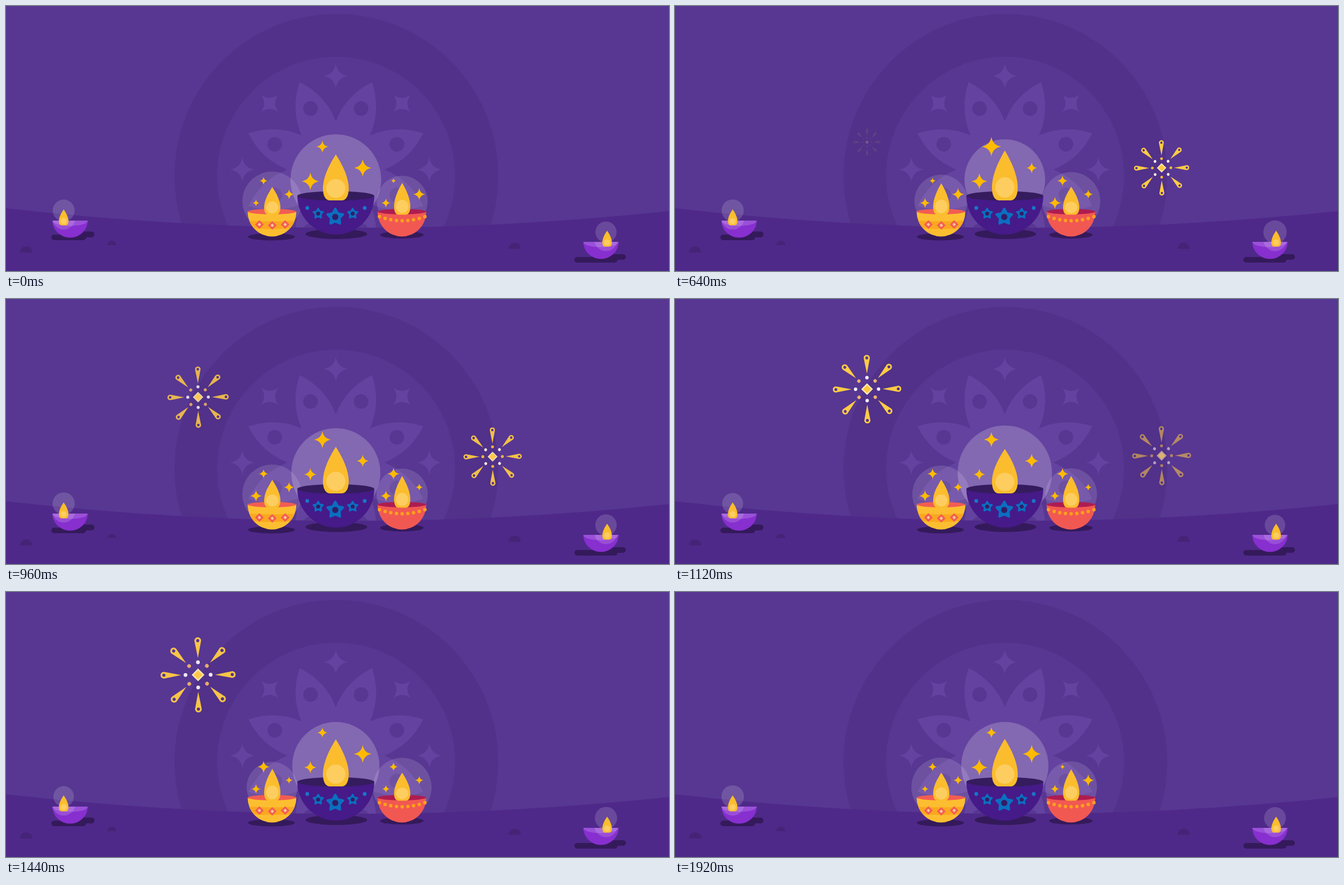
An HTML page with a canvas for the animation above (2 s loop, 1184 by 473 pixels).

```html
<!DOCTYPE html>
<html lang="en">
<head>
<meta charset="utf-8">
<title>Festival lamps</title>
<style>
  html, body { margin: 0; width: 100%; height: 100%; overflow: hidden; background: #573792; }
  canvas { display: block; width: 1184px; height: 473px; }
</style>
</head>
<body>
<canvas id="stage" width="1184" height="473"></canvas>
<script>
const ctx = document.getElementById('stage').getContext('2d');
const TAU = Math.PI * 2;
const LOOP = 2000, STEP = 80;
const BG = '#573792', SHADOW = '#341a5b', SPARK = '#ffbb00';

const clamp = v => Math.max(0, Math.min(1, v));
const wave = (t, mid, amp, peak, period) => mid + amp * Math.cos(TAU * (t - peak) / period);

function fill(color) {
  ctx.fillStyle = color;
  ctx.fill();
}

function ellipse(x, y, rx, ry, color) {
  ctx.beginPath();
  ctx.ellipse(x, y, rx, ry, 0, 0, TAU);
  fill(color);
}

const circle = (x, y, r, color) => ellipse(x, y, r, r, color);

function half(x, y, rx, ry, color, up) {
  ctx.beginPath();
  ctx.ellipse(x, y, rx, ry, 0, 0, Math.PI, !!up);
  ctx.closePath();
  fill(color);
}

function bar(x0, y0, x1, y1) {
  ctx.beginPath();
  ctx.roundRect(x0, y0, x1 - x0, y1 - y0, (y1 - y0) / 2);
  fill(SHADOW);
}

function diamond(x, y, r, color) {
  ctx.beginPath();
  ctx.moveTo(x, y - r);
  ctx.lineTo(x + r, y);
  ctx.lineTo(x, y + r);
  ctx.lineTo(x - r, y);
  fill(color);
}

function sparkle(x, y, r, color, turn = 0) {
  const k = r * 0.14;
  ctx.save();
  ctx.translate(x, y);
  ctx.rotate(turn);
  ctx.beginPath();
  ctx.moveTo(0, -r);
  ctx.quadraticCurveTo(k, -k, r, 0);
  ctx.quadraticCurveTo(k, k, 0, r);
  ctx.quadraticCurveTo(-k, k, -r, 0);
  ctx.quadraticCurveTo(-k, -k, 0, -r);
  fill(color);
  ctx.restore();
}

function fiveStar(x, y, r, hole) {
  const line = r * 0.25, reach = r - line / 2;
  ctx.beginPath();
  for (let i = 0; i < 10; i++) {
    const a = i * TAU / 10 - TAU / 4, d = i % 2 ? reach * 0.54 : reach;
    ctx.lineTo(x + d * Math.cos(a), y + d * Math.sin(a));
  }
  ctx.closePath();
  fill('#0b6fc1');
  ctx.strokeStyle = '#0b6fc1';
  ctx.lineWidth = line;
  ctx.lineJoin = 'round';
  ctx.stroke();
  circle(x, y, hole, '#321c66');
}

// Flame standing on (x, base); "rest" is the height at which its core is round.
function flame(x, base, top, w, rest, core) {
  const h = rest;
  ctx.save();
  ctx.translate(x, base);
  ctx.scale(1, (base - top) / rest);
  ctx.beginPath();
  ctx.moveTo(0, -h);
  ctx.bezierCurveTo(w * 0.3, -h * 0.87, w, -h * 0.55, w, -h * 0.26);
  ctx.bezierCurveTo(w, -h * 0.1, w * 0.8, 0, w * 0.45, 0);
  ctx.lineTo(-w * 0.45, 0);
  ctx.bezierCurveTo(-w * 0.8, 0, -w, -h * 0.1, -w, -h * 0.26);
  ctx.bezierCurveTo(-w, -h * 0.55, -w * 0.3, -h * 0.87, 0, -h);
  fill('#fbbd2d');
  circle(0, -h * 0.26, core, '#fdcd60');
  ctx.restore();
}

function flower(x, y) {
  const color = '#64429f', valley = 86, eighth = TAU / 8;
  const vx = valley * Math.sin(eighth / 2), vy = -valley * Math.cos(eighth / 2);
  for (let i = 0; i < 8; i++) {
    ctx.save();
    ctx.translate(x, y);
    ctx.rotate((i + 0.5) * eighth);
    ctx.beginPath();
    ctx.moveTo(0, 2);
    ctx.lineTo(-vx - 0.3, vy);
    ctx.quadraticCurveTo(-34, -130, 0, -169);
    ctx.quadraticCurveTo(34, -130, vx + 0.3, vy);
    fill(color);
    circle(0, -118, 13, BG);
    ctx.restore();
    const a = i * eighth;
    sparkle(x + 167 * Math.sin(a), y - 167 * Math.cos(a), 22, color, a);
  }
}

function backdrop() {
  ctx.fillStyle = BG;
  ctx.fillRect(0, 0, 1184, 473);
  circle(590, 303, 289, '#513189');
  circle(589.5, 303, 212.5, BG);
  flower(589, 292);
  ctx.beginPath();
  ctx.moveTo(0, 361);
  ctx.quadraticCurveTo(592, 428.5, 1184, 366);
  ctx.lineTo(1184, 473);
  ctx.lineTo(0, 473);
  fill('#4f2989');
  half(36, 440, 11, 11, '#452477', true);
  half(189, 427, 8, 8, '#452477', true);
  half(908.5, 433.5, 11, 11, '#452477', true);
}

function firework(t, f) {
  const alpha = Math.min(clamp((t - f.start) / 430), clamp((f.end - t) / 445));
  if (alpha <= 0) return;
  const e = Math.exp(-(t - f.ref) / 290);
  const r = f.size - f.grow * e;
  ctx.save();
  ctx.globalAlpha = alpha;
  ctx.translate(f.x, f.y + f.rise * e);
  ctx.rotate(-0.01);
  for (let i = 0; i < 8; i++) {
    ctx.save();
    ctx.rotate(i * TAU / 8);
    // Ray with a round, pierced head.
    ctx.beginPath();
    ctx.moveTo(0, -r * 0.45);
    ctx.lineTo(-r * 0.088, -r * 0.9);
    ctx.arc(0, -r * 0.91, r * 0.09, Math.PI, TAU);
    ctx.closePath();
    ctx.moveTo(r * 0.042, -r * 0.91);
    ctx.arc(0, -r * 0.91, r * 0.042, 0, TAU);
    ctx.fillStyle = '#ffcb45';
    ctx.fill('evenodd');
    circle(0, -r * 0.335, r * 0.05, f.dots[i % 2]);
    ctx.restore();
  }
  diamond(0, 0, r * 0.17, '#ffedba');
  diamond(0, 0, r * 0.12, '#ffc640');
  ctx.restore();
}

const fireworks = [
  { x: 869, y: 277.5, rise: 34.5, size: 53.5, grow: 12.5, ref: 320, start: 140, end: 1370,
    dots: ['#fbbd3a', '#fff4e6'] },
  { x: 343, y: 141.5, rise: 101.5, size: 70, grow: 46, ref: 640, start: 590, end: 1865,
    dots: ['#f6effa', '#efb268'] }
];

function bowl(x, y, rx, depth, rimRy, body, rim) {
  half(x, y, rx, depth, body);
  ellipse(x, y, rx, rimRy, rim);
}

function leftLamp(t) {
  circle(475, 348.5, wave(t, 49.1, 3.9, 960, 1000), 'rgba(255,255,255,.13)');
  ellipse(474, 412, 42, 6.5, SHADOW);
  half(475, 367, 43.5, 44.5, '#fcbe30');
  ctx.save();
  ctx.beginPath();
  ctx.ellipse(475, 367, 43.5, 44.5, 0, 0, Math.PI);
  ctx.clip();
  ctx.beginPath();
  ctx.moveTo(430, 383);
  ctx.quadraticCurveTo(475, 386, 520, 383);
  ctx.lineTo(520, 396);
  ctx.quadraticCurveTo(475, 400, 430, 396);
  fill('#fba71f');
  ctx.restore();
  ellipse(475, 367, 43.5, 4.8, '#f25d52');
  for (const [x, y] of [[452.5, 390], [475.5, 391.5], [498.5, 390]]) {
    diamond(x, y, 7.8, '#f25d52');
    diamond(x, y, 3.2, '#fbc59a');
  }
  flame(475.5, 372.5, wave(t, 319.3, 4, 20, 1000), 14.5, 51, 11);
}

function rightLamp(t) {
  circle(707.5, 348.5, wave(t, 49.2, 3.8, 520, 1000), 'rgba(255,255,255,.13)');
  ellipse(707, 408.5, 39, 6.5, SHADOW);
  bowl(707, 367, 43.5, 44.5, 4.8, '#f15852', '#ae1c51');
  for (let i = -4; i <= 4; i++) {
    circle(707.5 + i * 10.15, 383.3 - i * i * 0.46, 3.1, '#fb9f1f');
  }
  flame(707.5, 372.5, wave(t, 319.5, 4, 540, 1000), 14.5, 53, 11);
}

function mainLamp(t) {
  circle(589, 310, wave(t, 78.3, 6.4, 180, 1000), 'rgba(255,255,255,.2)');
  ellipse(590, 407, 55, 9, SHADOW);
  bowl(589, 339, 68.7, 69, 8.4, '#461a88', '#351c5e');
  for (const side of [-1, 1]) {
    circle(589.3 + side * 51.3, 360.5, 3.4, '#1a74c8');
    fiveStar(588.3 + side * 30.8, 370.5, 10.5, 3.6);
  }
  fiveStar(588, 376.5, 16.5, 5.5);
  flame(589, 347, wave(t, 263, 5.3, 190, 1000), 23, 83, 17);
}

function smallLamp(x, y, fx, glowY, glowR) {
  half(x, y, 31.5, 30.5, '#872fcf');
  half(x, y, 31.5, 9.5, '#9a50d8');
  // Light falling on the bowl.
  ctx.save();
  ctx.beginPath();
  ctx.ellipse(x, y, 31.5, 30.5, 0, 0, Math.PI);
  ctx.clip();
  circle(fx.glow, glowY + 13, 21, 'rgba(255,255,255,.15)');
  ctx.restore();
  circle(fx.glow, glowY, glowR, 'rgba(255,255,255,.15)');
  flame(fx.flame, y + 8.5, y - 20, 8.5, 28.5, 5.5);
}

// x, y, mean radius, swing, time of the peak
const sparkles = [
  [565, 251, 12.7, 4.7, 650], [637, 289, 13.4, 3.9, 1700], [543.5, 313, 13.2, 3.2, 220],
  [460, 312, 7.7, 2.8, 1430], [505.5, 336, 8.6, 2.4, 500], [446.5, 351.5, 8, 2, 1000],
  [692, 312, 7.5, 3.1, 950], [738, 336, 8.3, 2.4, 100], [678.5, 351.5, 8.5, 2, 570]
];

function draw(t) {
  backdrop();
  fireworks.forEach(f => firework(t, f));

  bar(81, 408, 143, 418);
  bar(118, 402.5, 158, 413);
  bar(1015, 448, 1092, 458);
  bar(1058, 443, 1107, 453);
  smallLamp(114.5, 383, { glow: 103, flame: 103 }, 365, wave(t, 19.2, 1.2, 800, 1000));
  smallLamp(1062.5, 421, { glow: 1071.5, flame: 1073.5 }, 403.5, wave(t, 19.6, 1.3, 650, 1000));

  leftLamp(t);
  rightLamp(t);
  mainLamp(t);
  for (const [x, y, mid, amp, peak] of sparkles) {
    sparkle(x, y, wave(t, mid, amp, peak, LOOP), SPARK);
  }
}

const began = performance.now();
function tick() {
  const t = (performance.now() - began) % LOOP;
  draw(Math.floor(t / STEP) * STEP);
  requestAnimationFrame(tick);
}
tick();
</script>
</body>
</html>
```
